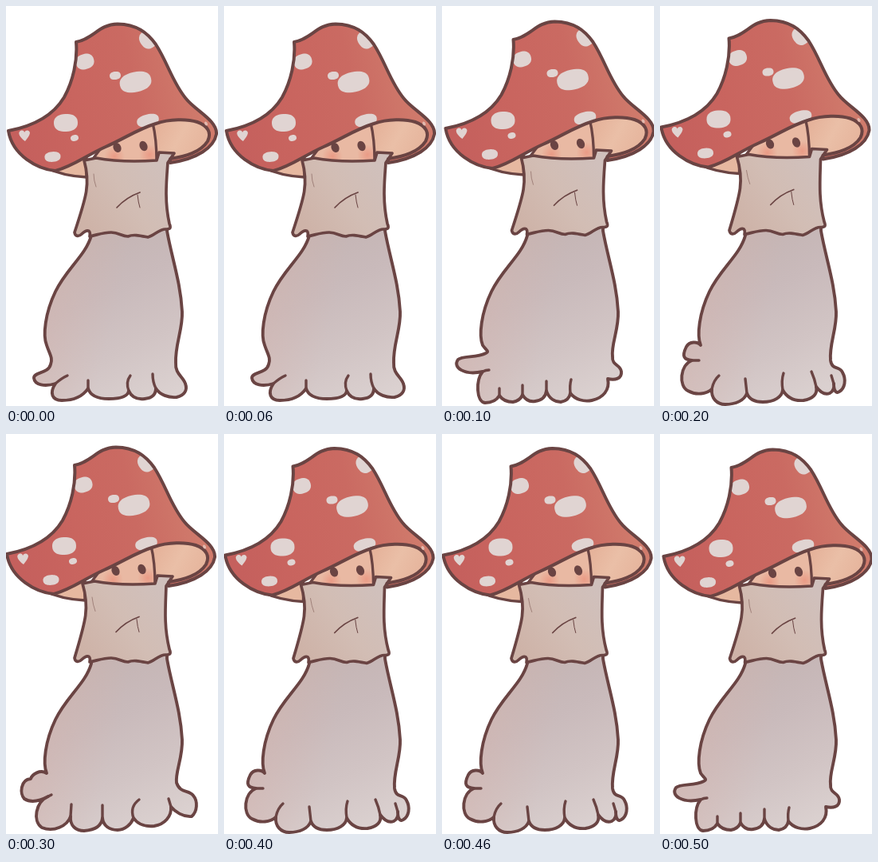
An HTML page with a canvas for the animation above (600 ms loop, 266x500 px).

```html
<!DOCTYPE html>
<html lang="en">
<head>
<meta charset="utf-8">
<title>Mushroom sway</title>
<style>
html, body { margin: 0; width: 100%; height: 100%; overflow: hidden; background: #fff; }
canvas { display: block; width: 100vw; height: 100vh; }
</style>
</head>
<body>
<canvas id="stage" width="266" height="500"></canvas>
<script>
const canvas = document.getElementById('stage');
const ctx = canvas.getContext('2d');
const W = 266, H = 500, STEP = 100;
const ORDER = [0, 1, 2, 3, 2, 1];
const INK = '#6a4443', PEACH = '#e6b8a0', SPOT = '#e0d4d2';

// Head and collar-hem offsets, ruffle outline and ruffle creases for each pose
const POSES = [
  {
    head: [0, 0], hem: [0, 0],
    ruffle: 'C55 436 59 440 56 448 C53 460 35 457 35 465 C36 474 49 476 62 472 ' +
      'C54 484 58 493 70 493 C86 493 97 487 103 478 C106 488 117 491 129 491 ' +
      'C143 491 153 488 154 481 C158 490 166 492 174 491 C184 490 188 485 188 478 ' +
      'C193 486 204 490 214 489 C224 487 228 480 225 472 C222 463 212 460 213 446',
    creases: 'M62 472Q70 465 77 462 M103 478V468 M154 481Q150 470 156 462 M188 478Q184 470 184 460'
  },
  {
    head: [1.5, -3], hem: [1.5, -2.5],
    ruffle: 'C55 430 60 432 55 434 C44 440 26 437 20 442 C13 452 28 462 51 457 ' +
      'C42 468 43 495 54 496 C63 496 69 492 72 487 C77 494 84 495 89 495 ' +
      'C95 494 99 491 101 486 C105 493 111 495 117 494 C125 493 130 489 131 481 ' +
      'C134 491 142 495 149 495 C156 494 160 490 161 484 C167 492 178 495 188 493 ' +
      'C202 490 211 480 208 466 C217 468 226 466 225 457 C224 448 213 450 214 438',
    creases: 'M51 457Q55 455 59 455 M72 487V478 M101 486V474 M131 481V469 M161 484Q160 474 162 467'
  },
  {
    head: [-1.5, -4.5], hem: [1, -2.5],
    ruffle: 'C47 419 37 419 33 426 C27 438 30 442 40 443 C25 449 23 475 35 481 ' +
      'C46 487 58 485 65 479 C64 490 71 498 82 498 C95 498 106 493 109 484 ' +
      'C112 492 119 495 129 495 C143 495 153 489 154 480 C159 489 168 494 180 493 ' +
      'C192 491 198 485 196 476 C202 484 208 486 213 484 C217 482 219 479 218 472 ' +
      'C218 481 221 485 225 482 C232 478 234 467 229 458 C225 449 216 456 214 443',
    creases: 'M40 443L49 443 M65 479Q67 468 74 462 M109 484L107 466 M154 480Q152 468 155 459 M196 476Q194 466 190 457 M218 472L215 462'
  },
  {
    head: [-2, -6], hem: [0, -3],
    ruffle: 'C43 419 33 425 31 431 C18 432 17 450 23 456 C31 461 42 459 53 453 ' +
      'C37 460 33 484 45 492 C60 498 77 490 81 478 C80 490 88 496 98 496 ' +
      'C111 495 120 490 121 480 C122 490 130 495 140 495 C149 495 157 488 160 480 ' +
      'C166 489 177 491 186 490 C199 488 208 478 207 466 C212 472 222 479 233 478 ' +
      'C240 472 241 459 235 452 C229 444 219 450 214 436',
    creases: 'M53 453L57 451 M81 478L82 463 M121 480L121 464 M160 480Q155 466 167 457 M207 466L204 456'
  }
];

// x, y, rx, ry, tilt
const SPOTS = [
  [99, 69.5, 11.5, 9.5, -.3], [137, 87, 7, 5, -.15], [162.5, 95, 20, 12.5, -.22], [178, 42, 10, 11.5, -.6],
  [178, 143, 14, 7.5, -.25], [75, 146, 15, 11, -.05], [86, 165, 5, 3.8, -.2], [58.5, 188.5, 10, 6.3, -.1]
];

const CAP = new Path2D('M3 156 C30 151 58 139 73 114 C84 94 90 68 88 45 C110 41 116 23 140 22.5 ' +
  'C164 23 177 33 188 48 C203 71 209 96 226 116 C238 131 265 143 264 160 ' +
  'C261 177 240 191 206 196 L206 191 C225 188 244 183 253 169 C258 159 254 150 240 145 ' +
  'C228 141 205 141 188 147 C165 154 150 165 125 176 C100 187 85 200 62 206 C40 204 8 187 3 156Z');
const GILLS = new Path2D('M180 148 L215 140 L242 144 L256 156 L252 172 L232 186 L200 193 L188 193Z');
const BACK_GILLS = new Path2D('M50 202 C64 209 82 213 101 214 L101 180Z');
const FACE = new Path2D('M106 195 L122 174 L184 146 Q189 166 189 195Z');
const HEART = new Path2D('M24 169 C17 164 15 159 17 157 C20 154 23 156 23 158 C25 154 30 155 30 159 C29 163 27 165 24 169Z');

function linear(x0, y0, x1, y1, colors) {
  const g = ctx.createLinearGradient(x0, y0, x1, y1);
  colors.forEach((c, i) => g.addColorStop(i / (colors.length - 1), c));
  return g;
}

function ink(path, width, color = INK) {
  ctx.lineWidth = width;
  ctx.strokeStyle = color;
  ctx.stroke(path);
}

function shape(path, fill, width) {
  ctx.fillStyle = fill;
  ctx.fill(path);
  if (width) ink(path, width);
}

// Superellipse: a power below 1 squares off the sides
function blob(x, y, rx, ry, tilt, fill, power = 1) {
  const bend = v => Math.sign(v) * Math.abs(v) ** power;
  ctx.save();
  ctx.translate(x, y);
  ctx.rotate(tilt);
  ctx.beginPath();
  for (let i = 0; i < 40; i++) {
    const a = i * Math.PI / 20;
    ctx.lineTo(rx * bend(Math.cos(a)), ry * bend(Math.sin(a)));
  }
  ctx.fillStyle = fill;
  ctx.fill();
  ctx.restore();
}

function blush(x, y, r) {
  const g = ctx.createRadialGradient(x, y, 0, x, y, r);
  g.addColorStop(0, 'rgba(235,125,105,.5)');
  g.addColorStop(1, 'rgba(235,125,105,0)');
  ctx.fillStyle = g;
  ctx.fillRect(x - r, y - r, 2 * r, 2 * r);
}

function drawSkirt(pose) {
  const body = new Path2D('M108 270 L107 287 C100 312 76 328 62 357 C49 384 46 412 51 424 ' + pose.ruffle +
    ' C212 423 222 404 221 382 C219 345 208 315 202 281 L202 270Z');
  shape(body, linear(110, 285, 205, 485, ['#c4b4b3', '#c9babb', '#d1c4c4', '#dbd1d0']));
  ctx.save();
  ctx.clip(body);
  ctx.fillStyle = linear(45, 390, 130, 410, ['rgba(216,180,172,.4)', 'rgba(216,180,172,0)']);
  ctx.fillRect(0, 270, W, 230);
  ctx.restore();
  ink(body, 3.9);
  ink(new Path2D(pose.creases), 3.4);
}

function drawUnderside() {
  shape(BACK_GILLS, PEACH, 3.3);
  shape(GILLS, linear(190, 150, 245, 180, ['#e5b29a', '#eabfa7', '#e6b59d']));
}

function drawFace() {
  shape(FACE, '#e9b9a3');
  ctx.save();
  ctx.clip(FACE);
  blush(136, 188, 13);
  blush(180, 186, 13);
  ctx.restore();
  ink(FACE, 3.3);
  blob(139.5, 177, 4.8, 6.2, -.45, INK);
  blob(172.5, 175, 4.8, 6.4, -.4, INK);
}

function drawCollar(pose) {
  const [hx, hy] = pose.head, [bx, by] = pose.hem;
  const top = (x, y) => `${x + hx} ${y + hy} `;
  const low = (x, y) => `${x + bx} ${y + by} `;
  const mid = (x, y) => `${x + (hx + bx) / 2} ${y + (hy + by) / 2} `;
  const cloth = new Path2D(
    'M' + top(98, 193) + 'C' + mid(106, 222) + mid(101, 238) + low(86, 283) +
    'C' + low(87, 289) + low(92, 288) + low(95, 285) + 'C' + low(100, 280) + low(107, 278) + low(105, 288) +
    'C' + low(115, 286) + low(122, 283) + low(132, 283) + 'C' + low(142, 283) + low(145, 288) + low(153, 288) +
    'C' + low(160, 285) + low(168, 287) + low(178, 289) + 'C' + low(186, 287) + low(192, 279) + low(200, 279) +
    'C' + low(207, 279) + low(207, 277) + low(205, 272) + 'C' + mid(199, 245) + mid(201, 222) + top(203, 196) +
    'L' + top(211, 184) + 'L' + top(192, 183) + 'L' + top(189, 193) + 'Q' + top(145, 196) + top(113, 190) + 'Z');
  shape(cloth, linear(100, 270, 200, 200, ['#ceb3a8', '#d2bdb4', '#d0c0bc']), 3.7);
  ink(new Path2D('M' + mid(139, 252) + 'Q' + mid(151, 239) + mid(168, 233)), 1.7);
  ink(new Path2D('M' + mid(165, 236) + 'Q' + mid(166, 246) + mid(168, 252)), 1);
  ink(new Path2D('M' + top(110, 210) + 'Q' + mid(110, 218) + mid(113, 226)), .8, '#94736c');
}

function drawCap() {
  shape(CAP, linear(20, 170, 245, 120, ['#c5605d', '#c9655f', '#ca6a62', '#d07b6c']));
  ctx.save();
  ctx.clip(CAP);
  for (const s of SPOTS) blob(...s, SPOT, .85);
  shape(HEART, SPOT);
  ctx.restore();
  ink(CAP, 4);
  blob(251, 147, 1.8, 2.6, -.5, '#e3b9ae');
}

function draw(pose) {
  const inHead = fn => {
    ctx.save();
    ctx.translate(...pose.head);
    fn();
    ctx.restore();
  };
  ctx.fillStyle = '#fff';
  ctx.fillRect(0, 0, W, H);
  drawSkirt(pose);
  inHead(drawUnderside);
  inHead(drawFace);
  drawCollar(pose);
  inHead(drawCap);
}

function tick() {
  draw(POSES[ORDER[Math.floor(performance.now() / STEP) % ORDER.length]]);
  requestAnimationFrame(tick);
}

ctx.lineJoin = ctx.lineCap = 'round';
tick();
</script>
</body>
</html>
```
